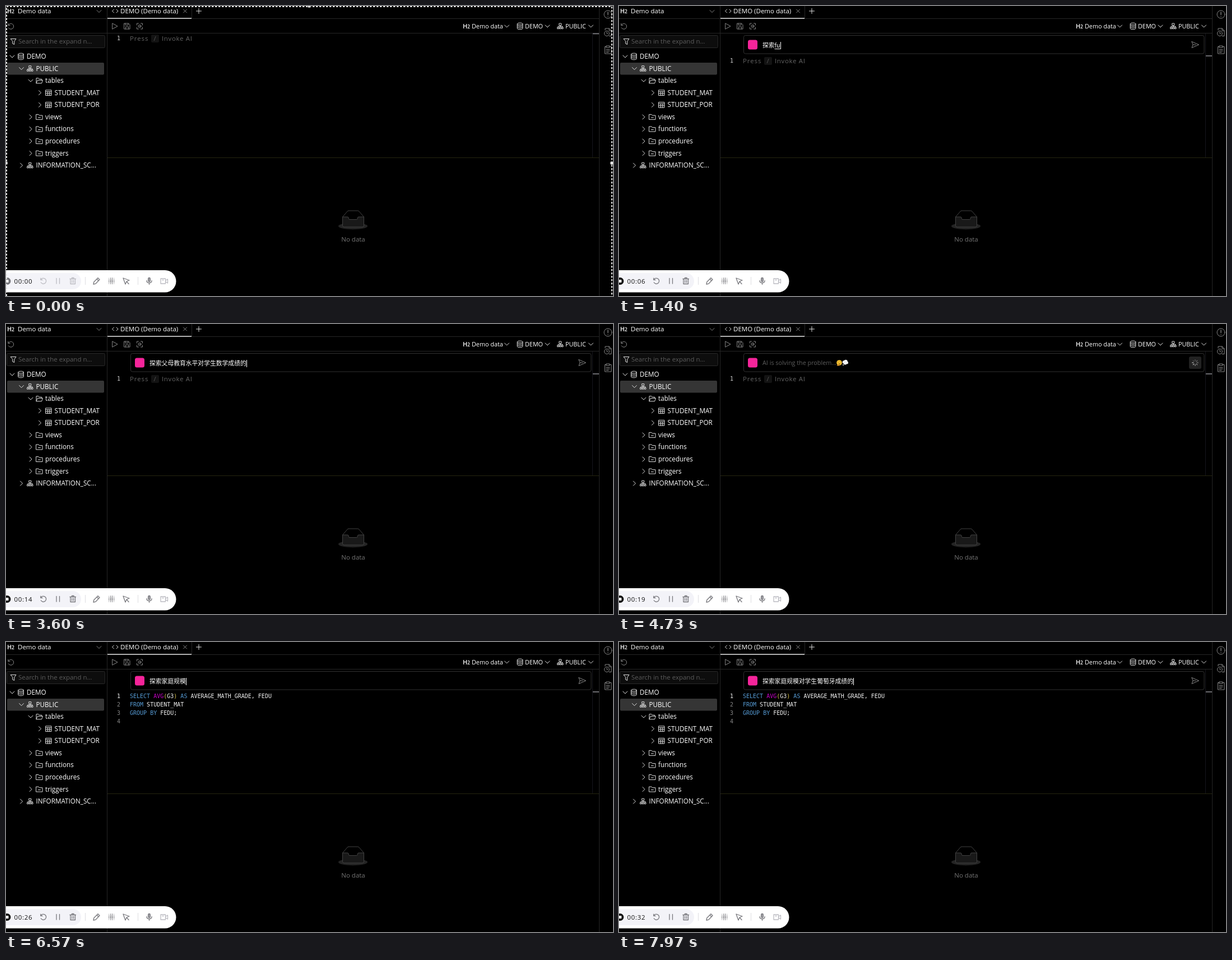
Animation, 1083 px wide and 517 px high, one loop 8 s. Source, as an HTML page:

```html
<!DOCTYPE html>
<html lang="en">
<head>
<meta charset="utf-8">
<title>SQL console with AI prompt</title>
<style>
html, body { margin: 0; width: 100%; height: 100%; overflow: hidden; background: #000; }
#stage { position: relative; width: 1083px; height: 517px; overflow: hidden; }
svg { position: absolute; left: 0; top: 0; display: block; }
text { font: 11.5px "Open Sans", "Noto Sans", sans-serif; fill: #fff; white-space: pre; }
#tree text { font-size: 11.7px; }
.small { font-size: 10.8px; }
.h2 { font-size: 10.8px; font-weight: 600; }
.dim { fill: #5c5c5c; }
.hint text { fill: #646464; }
.hint .num { fill: #d0d0d0; }
.code text, .num { font: 10px "DejaVu Sans Mono", monospace; fill: #f4f4f4; }
.code .kw { fill: #569cd6; }
.code .fn { fill: #c800c8; }
.code .br { fill: #d8c24a; }
.code .ln { fill: #858585; }
.icon { fill: none; stroke: #dedede; stroke-width: 1; stroke-linecap: round; stroke-linejoin: round; }
.grey { stroke: #858585; }
.ink { stroke: #77777c; stroke-width: 1.3; }
.idle .early { stroke: #bcbcc2; }
.idle #stop { fill: #77777c; }
.line { fill: none; stroke: #262626; }
.off { display: none; }
#prompt {
  position: absolute; left: 256px; top: 59px; height: 20px;
  font: 10.8px/20px "Noto Sans CJK SC", "Noto Sans CJK", sans-serif;
  color: #fff; white-space: pre;
}
#prompt u { text-underline-offset: 2px; }
#prompt i { display: inline-block; width: 1px; height: 13px; background: #fff; vertical-align: -3px; }
#prompt.off { display: none; }
</style>
</head>
<body>
<div id="stage">
<svg width="1083" height="517" viewBox="0 0 1083 517">
  <defs>
    <path id="right" d="M-2 -4L2 0L-2 4"/>
    <path id="down" d="M-4 -2L0 2L4 -2"/>
    <g id="db">
      <ellipse cy="-4" rx="4.8" ry="1.8"/>
      <path d="M-4.8 -4V4C-4.8 6.3 4.8 6.3 4.8 4V-4M-4.8 -1.3C-4.8 1 4.8 1 4.8 -1.3M-4.8 1.4C-4.8 3.7 4.8 3.7 4.8 1.4"/>
    </g>
    <path id="schema" d="M-1.8 -5H1.8V-1.5H-1.8ZM0 -1.5V2M-4 2V.3H4V2M-5 2H-2.7V4.6H-5ZM-1.2 2H1.2V4.6H-1.2ZM2.7 2H5V4.6H2.7Z"/>
    <path id="folder" d="M-5.5 -4.5H-1.5L0 -2.8H5.5V4.5H-5.5ZM-2 1H2"/>
    <path id="open" d="M-5.5 4.3V-4.5H-1.5L0 -2.8H4.3V-.8M-5.5 4.3L-3.2 -.8H6L4.2 4.3Z"/>
    <path id="grid" d="M-5 -4.8H5V4.8H-5ZM-5 -2H5M-5 1.3H5M-1.7 -2V4.8M1.7 -2V4.8"/>
    <path id="undo" d="M-4.6 -4.8V-1.6H-1.4M-4.4 -1.8A5 5 0 1 1 -4.2 2.8"/>
    <path id="send" d="M-6 -5.5L6.5 0L-6 5.5L-4 0ZM-4 0H1"/>
    <path id="spoke" d="M0 -3V-5.4"/>
  </defs>

  <g class="line">
    <path d="M180.5 0V517M1058.5 0V517M0 22.5H1058M0 48.5H1058M331.5 0V22"/>
    <path d="M181 270.5H1058" stroke="#25250f"/>
    <path d="M1046.5 49V270" stroke="#16161c"/>
    <path d="M181 22H331" stroke="#e4e4e4" stroke-width="1.5"/>
  </g>

  <!-- sidebar -->
  <text class="h2" x="2" y="13">H<tspan font-size="8.5">2</tspan></text>
  <text x="21" y="13">Demo data</text>
  <g class="icon grey">
    <use href="#down" x="166" y="9.5"/>
    <use href="#undo" x="8.5" y="36"/>
  </g>
  <rect x="1.5" y="52.5" width="175" height="22" rx="2" fill="#0d0d0d" stroke="#2a2a2a"/>
  <path class="icon" d="M8.5 58.5H18L14.8 63V68.5L11.7 67V63Z"/>
  <text class="dim" x="22" y="67">Search in the expand n…</text>
  <rect x="2" y="101" width="173" height="21.5" rx="2" fill="#353535"/>
  <g id="tree"></g>

  <!-- tab strip and toolbar -->
  <path class="icon" stroke-width="1.4" d="M192.500 6L189.500 9L192.500 12M197 6L200 9L197 12"/>
  <text x="204" y="13">DEMO (Demo data)</text>
  <path class="icon grey" d="M316.500 6L322.500 12M322.500 6L316.500 12"/>
  <path class="icon" d="M339.500 9H348.500M344 4.500V13.500"/>
  <g class="icon grey">
    <path d="M190 31L199 36L190 41Z"/>
    <path d="M211 31H218.500L221 33.500V41H211ZM213 31V34H218V31M213.500 41V37H218.500V41"/>
    <path d="M233.500 34V31H236.500M240.500 31H243.500V34M243.500 38V41H240.500M236.500 41H233.500V38"/>
    <circle cx="238.500" cy="36" r="2.5"/><circle cx="238.500" cy="36" r=".5"/>
  </g>
  <text class="h2" x="815" y="39.5">H<tspan font-size="8.5">2</tspan></text>
  <text class="small" x="831" y="39.5">Demo data</text>
  <text class="small" x="926" y="39.5">DEMO</text>
  <text class="small" x="998" y="39.5">PUBLIC</text>
  <g class="icon">
    <use href="#db" x="917" y="36"/>
    <use href="#schema" x="989" y="36"/>
    <use href="#down" x="893.5" y="36"/>
    <use href="#down" x="966" y="36"/>
    <use href="#down" x="1043.5" y="36"/>
  </g>

  <!-- right rail -->
  <g class="icon grey">
    <circle cx="1074" cy="15" r="7"/>
    <path d="M1074 11V15.500M1074 18.500V18.600" stroke-width="1.4"/>
    <path d="M1069 43V40H1076L1080 44V53.500H1076M1076 40V44H1080"/>
    <circle cx="1072" cy="49" r="4.5"/><path d="M1072 46.500V49H1074"/>
    <path d="M1071 72.500H1068.500V85H1080V72.500H1077M1071 71H1077V74H1071ZM1071 77.500H1077M1071 80H1077M1071 82.500H1075"/>
  </g>

  <!-- editor -->
  <rect id="ruler" x="1047" y="49" width="11" height="1.8" fill="#77777c"/>
  <g id="hint" class="hint">
    <text class="num" x="198" y="60.5">1</text>
    <text x="221" y="62" letter-spacing=".9">Press</text>
    <rect x="259" y="51" width="14" height="14" rx="2" fill="#131313"/>
    <text x="263.5" y="62" style="fill:#505050">/</text>
    <text x="278" y="62" letter-spacing=".65">Invoke AI</text>
  </g>
  <g id="sql" class="code off">
    <text x="198" y="99.5">1</text>
    <text class="ln" x="198" y="114.5">2</text>
    <text class="ln" x="198" y="129.5">3</text>
    <text class="ln" x="198" y="144.5">4</text>
    <text x="221" y="99.5"><tspan class="kw">SELECT</tspan> <tspan class="fn">AVG</tspan><tspan class="br">(</tspan>G3<tspan class="br">)</tspan> <tspan class="kw">AS</tspan> AVERAGE_MATH_GRADE, FEDU</text>
    <text x="221" y="114.5"><tspan class="kw">FROM</tspan> STUDENT_MAT</text>
    <text x="221" y="129.5"><tspan class="kw">GROUP</tspan> <tspan class="kw">BY</tspan> FEDU;</text>
  </g>

  <g id="box" class="off">
    <rect x="222.5" y="52.5" width="821.5" height="32.5" rx="3" fill="#000" stroke="#303030"/>
    <rect x="230" y="60.5" width="17" height="17" rx="3.5" fill="#f5249a"/>
    <use id="send-btn" class="icon grey" href="#send" x="1028" y="69"/>
    <g id="busy">
      <text class="dim" x="256" y="73" style="font-size:10.8px">AI is solving the problem...</text>
      <circle cx="393" cy="69" r="4.8" fill="#f7c231"/>
      <path d="M391 67.500V68.500M394.800 67V68M391.500 71.500L395 71" stroke="#5a3c10" fill="none"/>
      <path d="M388.500 73.500L393 71.500L392.500 74.500H389.500Z" fill="#e3952a"/>
      <g fill="#f2f2f2">
        <circle cx="401.5" cy="68" r="2.8"/><circle cx="404.5" cy="67" r="3.2"/>
        <circle cx="406.5" cy="69" r="2.5"/><circle cx="403.5" cy="70" r="2.6"/>
        <circle cx="400" cy="73" r="1"/>
      </g>
      <rect x="1017" y="58" width="22" height="22" rx="3" fill="#222"/>
      <g id="spin" class="icon"></g>
    </g>
  </g>

  <!-- empty result -->
  <ellipse cx="619" cy="392.5" rx="26" ry="5.7" fill="#242424"/>
  <g stroke="#434343" fill="none">
    <path d="M600.500 376L609 366.200Q610 365 611 365H627.500Q629 365 630 366.200L638.500 376"/>
    <path fill="#191919" d="M600.500 376H609.500Q611.300 376 611.300 378.300Q611.300 380.600 613 380.600H625.500Q627.200 380.600 627.200 378.300Q627.200 376 629 376H638.500V391.500Q638.500 394 636 394H603Q600.500 394 600.500 391.500Z"/>
  </g>
  <text x="619.5" y="419.5" text-anchor="middle" style="fill:#747474">No data</text>

  <!-- recorder bar -->
  <g id="recorder">
    <rect x="-30" y="471" width="333.5" height="39.5" rx="19.75" fill="#fff"/>
    <rect x="-30" y="476" width="164" height="29" rx="14.5" fill="#f3f3f8"/>
    <circle id="stop" cx="2" cy="490.5" r="6.5" fill="#111"/>
    <rect x="-.5" y="488" width="5" height="5" rx="1" fill="#fff"/>
    <text id="clock" x="14.5" y="494.5" letter-spacing=".65" style="fill:#111">00:00</text>
    <path d="M141.500 483V497M235.500 483V497" stroke="#dedee2"/>
    <g class="icon">
      <use class="ink early" href="#undo" x="66.5" y="490"/>
      <path class="ink early" d="M90 485.500V495M95.500 485.500V495"/>
      <path class="ink early" d="M114 486.500H124.500M117.500 486.500V484.500H121V486.500M115 486.500V495.500H123.500V486.500M117.800 489V493M120.700 489V493"/>
      <path class="ink" d="M156 496L156.800 492L164 484.800L167 487.800L159.800 495.200ZM162 486.800L165 489.800"/>
      <path class="ink" d="M209 485L220 489L215.200 491L213 496ZM215.500 491.500L219 495.500"/>
      <rect class="ink" x="253.7" y="484.5" width="3.6" height="7" rx="1.8" style="fill:#a5a5aa"/>
      <path class="ink" d="M251 489.500C251 495 260 495 260 489.500M255.500 493.500V496.500"/>
      <path class="ink" style="stroke:#bcbcc2" d="M276 486H284.500V495H276ZM284.500 489.500L288.500 487V494L284.500 491.500M279 488.500H281"/>
    </g>
    <g id="dots" fill="#77777c"></g>
  </g>

  <!-- capture frame -->
  <g id="frame">
    <path d="M1 517V1H1081V517" fill="none" stroke="#e8e8e8" stroke-width="2" stroke-dasharray="3.5 2.5"/>
    <g fill="#e8e8e8" stroke="#777"><circle cx="541" cy="0" r="3"/><circle cx="0" cy="280" r="3"/><circle cx="1081" cy="280" r="3"/></g>
  </g>

  <path id="beam" class="off" fill="none" stroke="#e8e8e8" stroke-width="1.3" d="M-3 -6.500Q0 -6.500 0 -4V4.500Q0 6.500 -3 6.500M3 -6.500Q0 -6.500 0 -4M0 4.500Q0 6.500 3 6.500M-1.500 1.500H1.500"/>
</svg>
<div id="prompt" class="off"><span></span><u></u><i></i></div>
</div>

<script>
const LOOP = 8000;
const $ = id => document.getElementById(id);
const show = (id, on) => $(id).classList.toggle('off', !on);

// Sidebar tree: depth, arrow, icon, label
const rows = [
  [0, 'down', 'db', 'DEMO'],
  [1, 'down', 'schema', 'PUBLIC'],
  [2, 'down', 'open', 'tables'],
  [3, 'right', 'grid', 'STUDENT_MAT'],
  [3, 'right', 'grid', 'STUDENT_POR'],
  [2, 'right', 'folder', 'views'],
  [2, 'right', 'folder', 'functions'],
  [2, 'right', 'folder', 'procedures'],
  [2, 'right', 'folder', 'triggers'],
  [1, 'right', 'schema', 'INFORMATION_SC...'],
];
$('tree').innerHTML = rows.map(([depth, arrow, icon, label], i) => {
  const x = 11 + depth * 16.5, y = 90 + i * 21.57;
  return `<g class="icon"><use href="#${arrow}" x="${x}" y="${y}"/><use href="#${icon}" x="${x + 15.5}" y="${y}"/></g>
    <text x="${x + 26}" y="${y + 4}">${label}</text>`;
}).join('');

$('spin').innerHTML = Array.from({ length: 8 }, (_, i) =>
  `<use href="#spoke" transform="rotate(${i * 45})" opacity="${0.3 + i * 0.1}"/>`).join('');

$('dots').innerHTML = Array.from({ length: 16 }, (_, i) => {
  const col = i % 4, row = i >> 2;
  const edge = (col % 3 === 0) + (row % 3 === 0);
  return `<circle cx="${183.5 + col * 3.1}" cy="${485.5 + row * 3.1}" r="${1.2 - edge * 0.3}"/>`;
}).join('');

// Pinyin typing: each part is composed letter by letter, then one more key commits it
const parse = s => s.split('|').map(p => p.split(':'));
const sentences = [
  { start: 1030, key: 44, parts: parse('tan suo:探索|fu mu:父母|jiao yu:教育|shui ping:水平|dui:对|xue sheng:学生|shu xue:数学|cheng ji:成绩|de:的|ying xiang:影响') },
  { start: 5650, key: 44.5, parts: parse('tan suo:探索|jia ting:家庭|gui mo:规模|dui:对|xue sheng:学生|pu tao ya:葡萄牙|cheng ji:成绩|de:的') },
];

function typed({ start, key, parts }, t) {
  let keys = Math.max(0, Math.floor((t - start) / key) + 1);
  let done = '';
  for (const [pinyin, word] of parts) {
    const size = pinyin.replace(/ /g, '').length;
    if (keys <= size) {
      let end = 0;
      for (; keys > 0; end++) if (pinyin[end] !== ' ') keys--;
      return [done, pinyin.slice(0, end)];
    }
    keys -= size + 1;
    done += word;
  }
  return [done, ''];
}

const OPEN = 700, SEND = 4300, ANSWER = 5250;
const [doneEl, composing] = $('prompt').children;

function draw(t) {
  const idle = t < 60, open = t >= OPEN;
  const busy = t >= SEND && t < ANSWER, answered = t >= ANSWER;
  show('frame', idle);
  $('recorder').classList.toggle('idle', idle);
  const sec = Math.floor(t / 250 + 0.45);
  $('clock').textContent = '00:' + String(sec).padStart(2, '0');

  show('box', open);
  show('busy', busy);
  show('send-btn', !busy);
  show('prompt', open && !busy);
  show('hint', !answered);
  show('sql', answered);
  $('hint').setAttribute('transform', `translate(0 ${open ? 40 : 0})`);
  $('ruler').setAttribute('y', open ? 88 : 48.5);

  const [done, part] = typed(sentences[answered ? 1 : 0], t);
  doneEl.textContent = done;
  composing.textContent = part;

  const turn = Math.floor(t / 31.25) % 8 * 45;
  $('spin').setAttribute('transform', `translate(1028 69) rotate(${turn})`);

  // The pointer glides into the prompt field before the second question
  show('beam', t >= 5350 && t < 5710);
  const p = Math.min(1, Math.max(0, (t - 5350) / 200)), left = (1 - p) ** 2;
  $('beam').setAttribute('transform', `translate(${433 + 60 * left} ${74.5 + 50 * left})`);
}

function tick() {
  draw(performance.now() % LOOP);
  requestAnimationFrame(tick);
}
tick();
</script>
</body>
</html>
```
